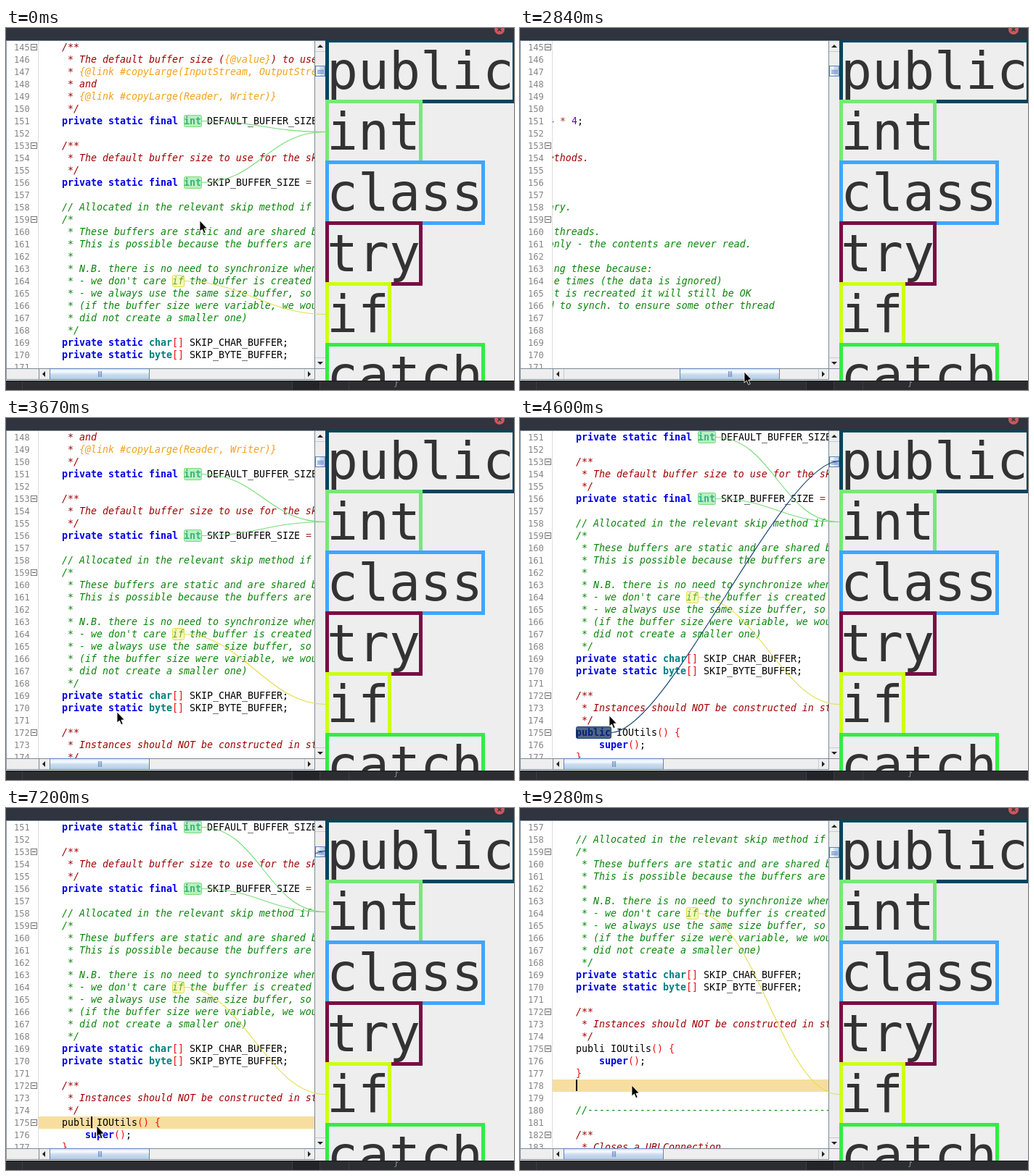
Animation of 700 by 500 pixels, one loop 9.57 s. Source, as an HTML page with a canvas:

```html
<!DOCTYPE html>
<html lang="en">
<head>
<meta charset="utf-8">
<title>Keyword links</title>
<style>
html, body { margin: 0; width: 100%; height: 100%; overflow: hidden; background: #2d3039; }
canvas { display: block; }
</style>
</head>
<body>
<canvas id="stage" width="700" height="500"></canvas>
<script>
const ctx = document.getElementById('stage').getContext('2d');
const LOOP = 9570, STEP = 45;
const FIRST = 145, ROW = 17, COL = 8, LEFT = 45, RIGHT = 425, TOP = 18, BOTTOM = 470;
const WINDOW_TOP = 17, WINDOW_BOTTOM = 487, BEND = 79;
const MONO = '"DejaVu Sans Mono", monospace';
const CODE_SIZE = '13.29px ', WORD_SIZE = '71.4px ';

const LINES = `    /**
     * The default buffer size ({@value}) to use for
     * {@link #copyLarge(InputStream, OutputStream)}
     * and
     * {@link #copyLarge(Reader, Writer)}
     */
    private static final int DEFAULT_BUFFER_SIZE = 1024 * 4;

    /**
     * The default buffer size to use for the skip() methods.
     */
    private static final int SKIP_BUFFER_SIZE = 2048;

    // Allocated in the relevant skip method if necessary.
    /*
     * These buffers are static and are shared between threads.
     * This is possible because the buffers are write-only - the contents are never read.
     *
     * N.B. there is no need to synchronize when creating these because:
     * - we don't care if the buffer is created multiple times (the data is ignored)
     * - we always use the same size buffer, so if it it is recreated it will still be OK
     * (if the buffer size were variable, we would need to synch. to ensure some other thread
     * did not create a smaller one)
     */
    private static char[] SKIP_CHAR_BUFFER;
    private static byte[] SKIP_BYTE_BUFFER;

    /**
     * Instances should NOT be constructed in standard programming.
     */
    public IOUtils() {
        super();
    }


    //-----------------------------------------------------------------------

    /**
     * Closes a URLConnection.`.split('\n');

const DOC = '#a00000', TAG = '#f5a01a', COMMENT = '#0a850a';
const STYLES = [
  [/^(private|static|final|public|super)$/, '#0000e6', 'bold '],
  [/^(int|char|byte)$/, '#008080', 'bold '],
  [/^\d+$/, '#6400c8', ''],
  [/^[=*]$/, '#a03030', ''],
  [/^[()[\]{}]$/, '#f01010', ''],
];

const WORDS = [
  ['public', '#004560'], ['int', '#77e877'], ['class', '#3ea6ff'],
  ['try', '#790d45'], ['if', '#ccff15'], ['catch', '#33ec43'],
];

// Highlighted words: line, column, length, target panel, fill, alpha, outline
const MARKS = [
  { line: 151, col: 25, len: 3, word: 1, fill: '#6de482', alpha: .5, edge: '#79da79' },
  { line: 156, col: 25, len: 3, word: 1, fill: '#6de482', alpha: .5, edge: '#79da79' },
  { line: 164, col: 23, len: 2, word: 4, fill: '#e8f050', alpha: .38, edge: '#e2de48' },
  { line: 175, col: 4, len: 6, word: 0, fill: '#0c2d52', alpha: .72, edge: '#123f70' },
];

// Pointer positions: time, x, y
const POINTER = [
  [0, 267, 266], [40, 267, 266], [130, 265, 255], [630, 174, 474], [830, 174, 474],
  [910, 172, 472], [1409, 172, 472], [1410, 295, 470], [1620, 295, 470], [1850, 285, 480],
  [2110, 283, 472], [2260, 283, 472], [2560, 335, 483], [2840, 309, 475], [3100, 12, 482],
  [3200, 60, 476], [3520, 153, 406], [3990, 153, 406], [4760, 118, 412], [4930, 118, 412],
  [5380, 125, 439], [7550, 125, 439], [8000, 181, 342], [8440, 172, 350], [8700, 172, 350],
  [9100, 154, 383], [LOOP, 154, 383],
];

function pointerAt(t) {
  const i = POINTER.findIndex((p, k) => k && t < p[0]) - 1;
  const [t0, x0, y0] = POINTER[i], [t1, x1, y1] = POINTER[i + 1];
  const held = Math.floor((t - t0) / STEP) * STEP;
  const p = held / (t1 - t0), e = p * p * (3 - 2 * p);
  return [Math.round(x0 + (x1 - x0) * e), Math.round(y0 + (y1 - y0) * e)];
}

// Last value whose start time has passed
const stepped = (t, steps) => steps.filter(s => t >= s[0]).pop()[1];

function thumbAt(t, pointerX) {
  if (t >= 2260 && t < 3240) return Math.max(0, Math.min(213, pointerX - 149));
  return stepped(t, [[0, 0], [1410, 4], [1470, 134], [3240, 0]]);
}

const scrollAt = t => stepped(t, [[0, 0], [3670, 51], [3990, 102], [8610, 153], [8740, 204]]);

// No caret, or its line and column; the caret itself may be blinked off
const caretAt = t => stepped(t, [
  [0, null], [5170, [175, 10, true]], [5670, [175, 10, false]],
  [6430, [175, 9, true]], [9140, [178, 4, true]],
]);

function rect(color, x, y, w, h) {
  ctx.fillStyle = color;
  ctx.fillRect(x, y, w, h);
}

function clipped(x, y, w, h, draw) {
  ctx.save();
  ctx.beginPath();
  ctx.rect(x, y, w, h);
  ctx.clip();
  draw();
  ctx.restore();
}

function text(str, x, y, color, font) {
  ctx.fillStyle = color;
  ctx.font = font;
  ctx.fillText(str, x, y);
}

function polygon(points, color) {
  ctx.beginPath();
  points.forEach(([x, y]) => ctx.lineTo(x, y));
  ctx.closePath();
  ctx.fillStyle = color;
  ctx.fill();
}

function tokens(line, inDoc, inComment) {
  if (inDoc || inComment) {
    const color = inDoc ? DOC : COMMENT;
    return line.split(/(\{@[^}]*\})/).map(s => [s, s.startsWith('{@') ? TAG : color, 'italic ']);
  }
  return line.split(/(\s+|\w+|[^\w\s])/).filter(Boolean).map(s => {
    const style = STYLES.find(([re]) => re.test(s));
    return style ? [s, style[1], style[2]] : [s, '#000', ''];
  });
}

// Comment state per line, found once
let block = '';
const KINDS = LINES.map(line => {
  const s = line.trim();
  if (s.startsWith('/**')) block = 'doc';
  else if (s.startsWith('/*')) block = 'comment';
  const kind = s.startsWith('//') ? 'comment' : block;
  if (s.endsWith('*/')) block = '';
  return kind;
});

function drawCode(t, sx, sy, caret) {
  const edited = t >= 6430;
  rect('#fff', 0, WINDOW_TOP, RIGHT, BOTTOM - WINDOW_TOP);
  clipped(0, TOP, RIGHT, BOTTOM - TOP, () => {
    LINES.forEach((line, i) => {
      const y = TOP + i * ROW - sy, number = FIRST + i;
      if (y < TOP - ROW || y > BOTTOM) return;
      text(number, 11, y + 13, '#858585', '12px ' + MONO);
      if (line.trim().startsWith('/*') || number === 175) {
        ctx.strokeStyle = '#777';
        ctx.lineWidth = 1;
        ctx.strokeRect(34.5, y + 4.5, 8, 8);
        rect('#555', 36, y + 8, 5, 1);
      }
    });
  });
  rect('#ddd', 44, TOP, 1, BOTTOM - TOP);
  clipped(LEFT, TOP, RIGHT - LEFT, BOTTOM - TOP, () => {
    const rowTop = line => TOP + (line - FIRST) * ROW - sy;
    if (caret) rect('#f7dea0', LEFT, rowTop(caret[0]), RIGHT - LEFT, ROW);
    LINES.forEach((source, i) => {
      const y = TOP + i * ROW - sy;
      if (y < TOP - ROW || y > BOTTOM) return;
      const line = edited ? source.replace('public', 'publi') : source;
      let col = 0;
      for (const [str, color, weight] of tokens(line, KINDS[i] === 'doc', KINDS[i] === 'comment')) {
        text(str, LEFT + col * COL - sx, y + 13, color, weight + CODE_SIZE + MONO);
        col += str.length;
      }
    });
    if (caret && caret[2]) rect('#000', LEFT + caret[1] * COL - sx, rowTop(caret[0]), 2, ROW - 1);
  });
}

function arrow(cx, cy, dx, dy) {
  const side = s => [cx - dx * 2 + s * dy * 4, cy - dy * 2 + s * dx * 4];
  polygon([[cx + dx * 2, cy + dy * 2], side(1), side(-1)], '#222');
}

function bar(x, y, w, h, vertical) {
  const g = vertical ? ctx.createLinearGradient(x, 0, x + w, 0) : ctx.createLinearGradient(0, y, 0, y + h);
  g.addColorStop(0, '#d5e4f2');
  g.addColorStop(.3, '#f6fafd');
  g.addColorStop(.55, '#c8dbed');
  g.addColorStop(1, '#b4cce4');
  rect(g, x, y, w, h);
  ctx.strokeStyle = '#6382bf';
  ctx.lineWidth = 1;
  ctx.strokeRect(x + .5, y + .5, w - 1, h - 1);
  for (let k = -1; k <= 1; k++) {
    if (vertical) rect('#6382bf', x + 3, Math.round(y + h / 2) + k * 2, w - 5, 1);
    else rect('#6382bf', Math.round(x + w / 2) + k * 2, y + 4, 1, h - 8);
  }
}

function drawScrollbars(thumb, sy) {
  rect('#eee', 0, BOTTOM, 440, WINDOW_BOTTOM - BOTTOM);
  rect('#eee', RIGHT, WINDOW_TOP, 15, BOTTOM - WINDOW_TOP);
  rect('#7a8a99', 0, WINDOW_TOP, 440, 1);
  rect('#7a8a99', RIGHT, TOP, 1, 468);
  rect('#7a8a99', 0, BOTTOM, 440, 1);
  rect('#7a8a99', 0, 485, 426, 1);
  rect('#7a8a99', LEFT, BOTTOM, 1, 16);
  rect('#c5ccd4', 60, BOTTOM + 1, 1, 14);
  rect('#c5ccd4', 411, BOTTOM + 1, 1, 14);
  rect('#c5ccd4', 426, 32, 14, 1);
  rect('#c5ccd4', 426, 455, 14, 1);
  arrow(433, 25, 0, -1);
  arrow(433, 463, 0, 1);
  arrow(52, 478, -1, 0);
  arrow(418, 478, 1, 0);
  bar(60 + thumb, BOTTOM, 138, 16, false);
  bar(426, 52 + Math.round(sy / 100), 14, 15, true);
}

function drawPanel() {
  const height = WINDOW_BOTTOM - WINDOW_TOP;
  rect('#eee', 440, WINDOW_TOP, 260, height);
  clipped(440, WINDOW_TOP, 260, height, () => {
    WORDS.forEach(([word, color], i) => {
      const y = 17.5 + 84 * i;
      ctx.font = WORD_SIZE + MONO;
      ctx.strokeStyle = color;
      ctx.lineWidth = 5;
      ctx.strokeRect(442.5, y, Math.round(ctx.measureText(word).width), 84);
      text(word, 442, y + 66.5, '#333', ctx.font);
    });
  });
}

function link(x, y, word, color) {
  const endY = 59.5 + 84 * word;
  ctx.beginPath();
  ctx.moveTo(x, y);
  ctx.bezierCurveTo(x + BEND, y, 440 - BEND, endY, 440, endY);
  ctx.strokeStyle = color;
  ctx.lineWidth = 1.1;
  ctx.stroke();
}

function drawMarks(t, sx, sy) {
  for (const m of MARKS) {
    const len = m.line === 175 && t >= 6430 ? 5 : m.len;
    const x = LEFT + m.col * COL - sx, y = TOP + (m.line - FIRST) * ROW - sy;
    const right = x + len * COL;
    if (right <= LEFT || x >= RIGHT || y < TOP || y + ROW > BOTTOM) continue;
    if (m.line === 175 && t >= 7200) {
      // The part over the scrollbar stays until the next repaint
      if (t < 8610) clipped(426, TOP, 14, 452, () => link(right, y + 8.5, m.word, m.edge));
      continue;
    }
    clipped(LEFT, TOP, RIGHT - LEFT, BOTTOM - TOP, () => {
      ctx.beginPath();
      ctx.roundRect(x + .5, y + .5, len * COL, ROW - 1, 2);
      ctx.globalAlpha = m.alpha;
      ctx.fillStyle = m.fill;
      ctx.fill();
      ctx.globalAlpha = 1;
      ctx.strokeStyle = m.edge;
      ctx.lineWidth = 1;
      ctx.stroke();
    });
    link(right, y + 8.5, m.word, m.edge);
  }
}

function drawFrame() {
  rect('#2f343f', 0, 0, 700, WINDOW_TOP);
  ctx.beginPath();
  ctx.arc(680, 2, 7, 0, Math.PI * 2);
  ctx.fillStyle = '#cc575d';
  ctx.fill();
  ctx.strokeStyle = '#2f343f';
  ctx.lineWidth = 1.5;
  ctx.beginPath();
  ctx.moveTo(677.5, -.5);
  ctx.lineTo(682.5, 4.5);
  ctx.moveTo(682.5, -.5);
  ctx.lineTo(677.5, 4.5);
  ctx.stroke();
  rect('#2b2d31', 0, WINDOW_BOTTOM, 700, 13);
  rect('#17191d', 0, WINDOW_BOTTOM, 700, 1);
  rect('#222428', 394, 488, 38, 12);
  for (const x of [22, 394, 432, 472]) rect('#3a3d42', x, 488, 1, 12);
  clipped(0, 488, 700, 12, () => text('}', 534, 494, '#8a8d92', '12px ' + MONO));
  rect('#8796a8', 0, TOP, 1, 468);
}

function drawPointer(x, y) {
  const shape = [[0, 0], [0, 15], [3.4, 12], [5.8, 17.6], [8.2, 16.6], [5.8, 11.2], [10.2, 10.8]];
  polygon(shape.map(([dx, dy]) => [x + dx, y + dy]), '#000');
  ctx.strokeStyle = '#fff';
  ctx.lineWidth = 1;
  ctx.globalAlpha = .8;
  ctx.stroke();
  ctx.globalAlpha = 1;
}

function render(t) {
  const [px, py] = pointerAt(t);
  const thumb = thumbAt(t, px), sx = Math.round(thumb * 2.74), sy = scrollAt(t);
  drawCode(t, sx, sy, caretAt(t));
  drawScrollbars(thumb, sy);
  drawPanel();
  drawFrame();
  drawMarks(t, sx, sy);
  drawPointer(px, py);
}

const start = performance.now();
function tick() {
  render((performance.now() - start) % LOOP);
  requestAnimationFrame(tick);
}
tick();
</script>
</body>
</html>
```
